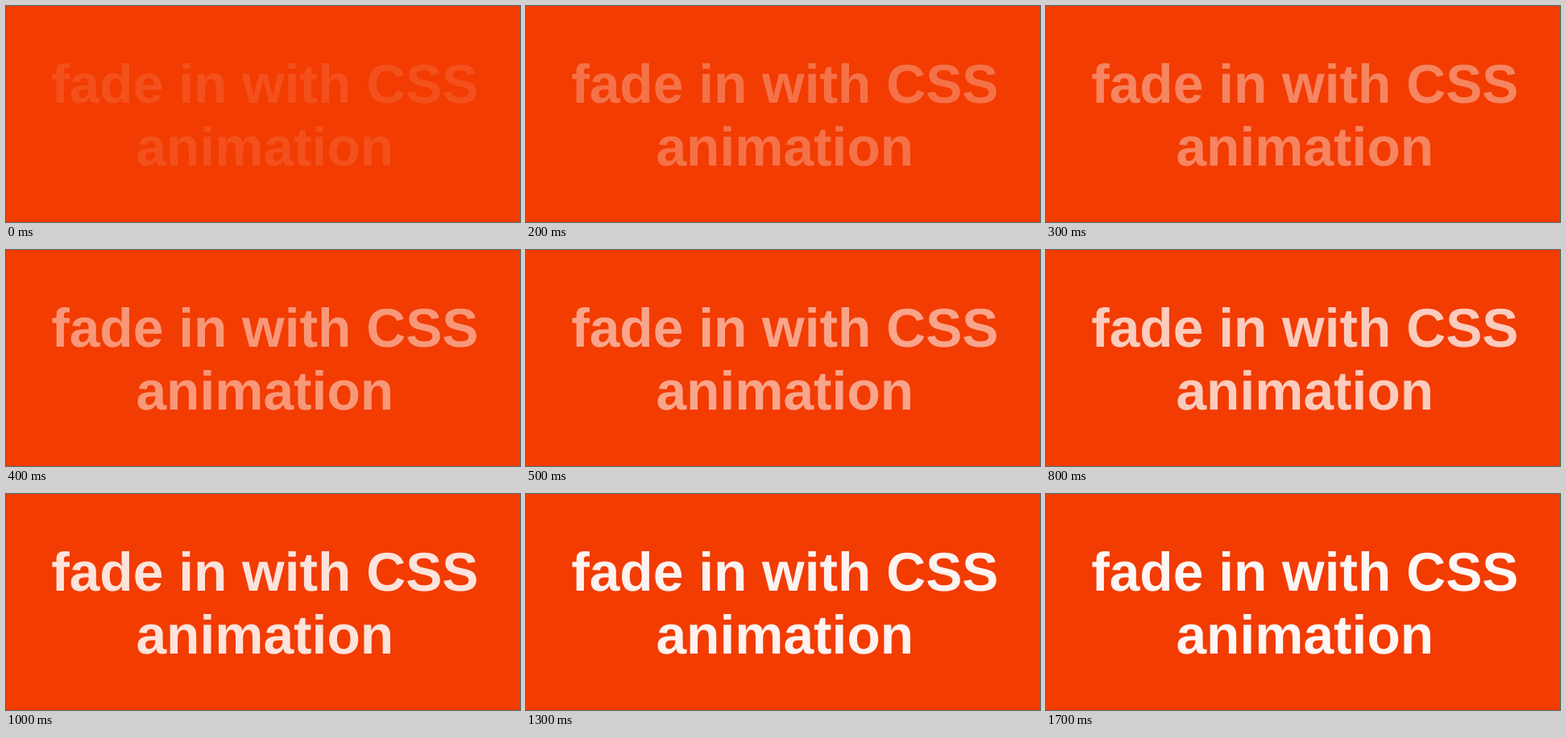
Recreate the animation shown at these times as an HTML page. Size 638 by 268 pixels, loop 1.8 s.

```html
<!DOCTYPE html>
<html lang="en">
<head>
<meta charset="utf-8">
<title>Fade in</title>
<style>
  html, body { margin: 0; width: 100%; height: 100%; overflow: hidden; background: #f23c02; }
  svg { display: block; width: 638px; height: 268px; }
  text {
    font: bold 67.7px "Liberation Sans", Arial, sans-serif;
    fill: #fff;
    text-anchor: middle;
    text-rendering: geometricPrecision;
  }
</style>
</head>
<body>
<svg viewBox="0 0 638 268">
  <g id="title" opacity="0.1">
    <text x="321.3" y="120.3">fade in with CSS</text>
    <text x="321.3" y="198.2">animation</text>
  </g>
</svg>
<script>
const LOOP = 1800, STEP = 100;
// [time in ms, opacity]
const fade = [[0, .1], [200, .28], [400, .47], [700, .68], [1000, .86], [1300, .94], [1500, .96], [LOOP, .96]];
const title = document.getElementById('title');

function opacityAt(time) {
  const next = fade.findIndex(([t]) => t > time);
  const [t0, a] = fade[next - 1], [t1, b] = fade[next];
  return a + (b - a) * (time - t0) / (t1 - t0);
}

const start = performance.now();
function draw() {
  const time = Math.max(0, performance.now() - start) % LOOP;
  title.setAttribute('opacity', opacityAt(Math.floor(time / STEP) * STEP));
  requestAnimationFrame(draw);
}
draw();
</script>
</body>
</html>
```
